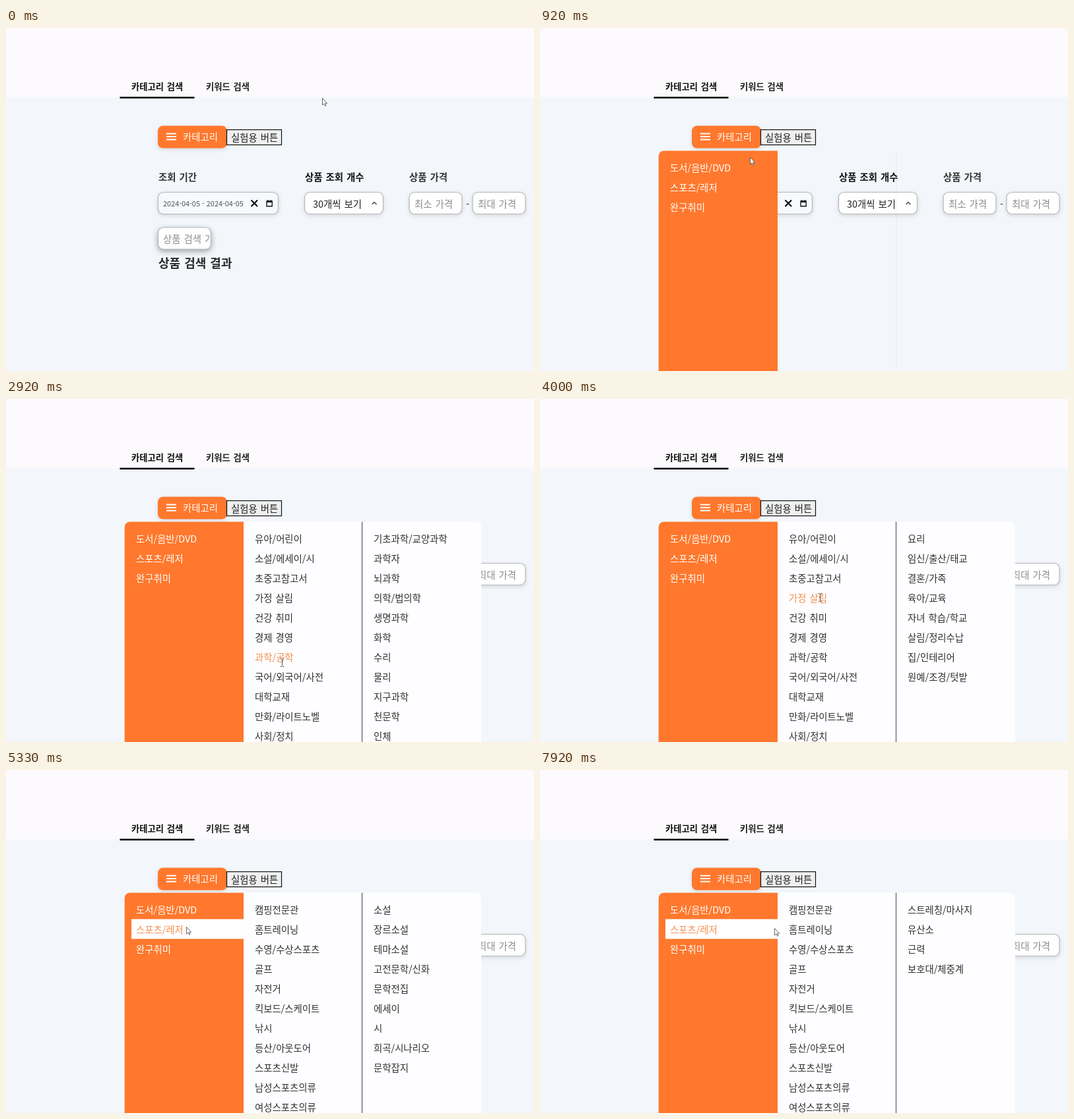
An HTML page that plays this animation: 800 px wide and 521 px high, repeating every 8 s.

```html
<!DOCTYPE html>
<html lang="ko">
<head>
<meta charset="utf-8">
<style>
  html, body { margin: 0; width: 100%; height: 100%; overflow: hidden; background: #f3f7fc; }
  svg { display: block; width: 800px; height: 521px; }
  text { font-family: "Noto Sans CJK KR", "Noto Sans CJK", "Noto Sans CJK JP", sans-serif; word-spacing: 1px; white-space: pre; }
  .soft { filter: drop-shadow(0 2px 3px rgba(0, 0, 0, .13)); }
  .deep { filter: drop-shadow(0 3px 4px rgba(0, 0, 0, .35)); }
</style>
</head>
<body>
<svg viewBox="0 0 800 521">
  <defs>
    <clipPath id="field"><rect x="232" y="304" width="76" height="32"/></clipPath>
  </defs>
  <g id="page"></g>
  <g id="menu"></g>
  <g id="cursor"></g>
</svg>
<script>
const FPS = 12, FRAMES = 96, FADE = 4.2;
const ORANGE = '#ff782d', HOVER = '#f4904f', INK = '#303030';
const SIZE = 14.4, TOP = 197, ROW = 30;
const $ = id => document.getElementById(id);

const categories = ['도서/음반/DVD', '스포츠/레저', '완구취미'];
const groups = [
  ['유아/어린이', '소설/에세이/시', '초중고참고서', '가정 살림', '건강 취미', '경제 경영',
   '과학/공학', '국어/외국어/사전', '대학교재', '만화/라이트노벨', '사회/정치'],
  ['캠핑전문관', '홈트레이닝', '수영/수상스포츠', '골프', '자전거', '킥보드/스케이트',
   '낚시', '등산/아웃도어', '스포츠신발', '남성스포츠의류', '여성스포츠의류']
];
const details = {
  '유아/어린이': ['그림책', '어린이 문학', '초점책/영아책', '놀이책/토이북', '학습/교양', '만화/애니메이션',
    '전집/세트', '어린이 잡지', '유아동 해외도서', '음반/DVD', '누리과정 주제'],
  '소설/에세이/시': ['소설', '장르소설', '테마소설', '고전문학/신화', '문학전집', '에세이', '시', '희곡/시나리오', '문학잡지'],
  '초중고참고서': ['초등 참고서', '중등 참고서', '고등 참고서', '수능 대비', '검정고시', '학습법', '사전/도감'],
  '가정 살림': ['요리', '임신/출산/태교', '결혼/가족', '육아/교육', '자녀 학습/학교', '살림/정리수납', '집/인테리어', '원예/조경/텃밭'],
  '건강 취미': ['건강/의학', '다이어트', '운동/스포츠', '등산/낚시', '바둑/장기', '공예/수예', '반려동물', '사진/영상'],
  '경제 경영': ['경제', '경영', '마케팅', '재테크/투자', '창업/취업', '무역/유통', '회계/세무', '인터넷 비즈니스'],
  '과학/공학': ['기초과학/교양과학', '과학자', '뇌과학', '의학/법의학', '생명과학', '화학', '수리', '물리', '지구과학', '천문학', '인체'],
  '홈트레이닝': ['스트레칭/마사지', '유산소', '근력', '보호대/체중계']
};

// pointer path: step, x, y
const path = [
  [0, 479.5, 106.5], [3, 430, 122], [5, 350, 152], [7, 308, 166], [9, 309, 176], [11, 318, 196],
  [13, 318, 209], [16, 345, 214], [18, 382, 218], [20, 408, 221], [24, 410, 240], [28, 412, 300],
  [32, 416, 372], [35, 418, 400], [40, 421, 396], [44, 424, 352], [48, 424, 301], [50, 424, 294],
  [54, 415, 243], [57, 370, 232], [58, 345, 222], [60, 300, 214], [62, 283, 226], [64, 273, 238],
  [72, 273, 238], [75, 330, 240], [78, 416, 242], [79, 416, 242], [84, 444, 240], [85, 444, 240],
  [86, 440, 241], [87, 440, 241], [88, 444, 240], [90, 444, 240], [95, 355, 240]
];

const label = (x, y, str, fill = INK, size = SIZE, weight = 400, extra = '') =>
  `<text x="${x}" y="${y + size * .4}" font-size="${size}" font-weight="${weight}" fill="${fill}" ${extra}>${str}</text>`;
const rect = (x, y, w, h, fill, extra = '') =>
  `<rect x="${x}" y="${y}" width="${w}" height="${h}" fill="${fill}" ${extra}/>`;
const box = (x, y, w, fill = '#fff', cls = 'soft') =>
  rect(x + .5, y + .5, w - 1, 33, fill, `rx="8" stroke="#b6b6b6" stroke-width="1.2" class="${cls}"`);
const line = (d, stroke, width) =>
  `<path d="${d}" fill="none" stroke="${stroke}" stroke-width="${width}"/>`;

$('page').innerHTML =
  rect(0, 0, 800, 521, '#f3f7fc') + rect(0, 0, 800, 105.5, '#fcfafc') +
  label(190, 89, '카테고리 검색', '#111', 13.3, 700) + label(303, 89, '키워드 검색', '#222', 13.3, 700) +
  rect(172.5, 104.5, 113, 2.5, '#000') +
  rect(230, 148.5, 105, 34, ORANGE, 'rx="8" class="soft"') +
  line('M243 160.5H258M243 165H258M243 169.5H258', '#fff', 1.8) +
  label(268, 165, '카테고리', '#fff') +
  rect(334.5, 154.5, 83, 23, '#efefef', 'stroke="#111" stroke-width="1.2"') +
  label(341, 166, '실험용 버튼', '#222') +
  label(231, 226, '조회 기간', '#333', SIZE, 700) +
  label(453, 226, '상품 조회 개수', '#111', SIZE, 700) +
  label(611, 226, '상품 가격', '#333', SIZE, 700) +
  box(230, 249, 183, '#f6f9fd') +
  label(238, 266.5, '2024-04-05 - 2024-04-05', '#555', 10.9, 400, 'style="word-spacing:0"') +
  line('M371.5 261.5L381 271M381 261.5L371.5 271', '#000', 2) +
  line('M395 263H403.2V270.7H395ZM395 264.2H403.2M396.8 261V263M401.4 261V263', '#111', 1.4) +
  box(452, 249, 120) + label(465, 267, '30개씩 보기', '#222') +
  line('M554.5 268L558 264.5L561.5 268', '#444', 1.4) +
  box(610.5, 249, 81) + label(619, 267, '최소 가격', '#8c8c8c') +
  label(697, 267, '-') +
  box(706.5, 249, 81) + label(715, 267, '최대 가격', '#8c8c8c') +
  box(230, 302.5, 81, '#fff', 'deep') +
  label(238, 320, '상품 검색 가', '#8c8c8c', SIZE, 400, 'clip-path="url(#field)"') +
  label(231, 357, '상품 검색 결과', '#2a2a2a', 18, 700);

const pen = document.createElement('canvas').getContext('2d');
pen.font = SIZE + 'px "Noto Sans CJK KR", "Noto Sans CJK JP", sans-serif';
const textWidth = str => pen.measureText(str).width + str.split(' ').length - 1;

function pointer(n) {
  const i = Math.max(1, path.findIndex(p => p[0] >= n));
  const [a, ax, ay] = path[i - 1], [b, bx, by] = path[i];
  const k = (n - a) / (b - a);
  return [ax + (bx - ax) * k, ay + (by - ay) * k];
}

// walk the pointer once and note what the menu shows at every step
const states = [];
let opened = -1, mid = -1, last = -1, cat = 0, detail = '';
for (let n = 0; n < FRAMES; n++) {
  const [x, y] = pointer(n);
  if (opened < 0 && x > 230 && x < 335 && y > 148 && y < 182) opened = n;
  let col = -1, row = -1, beam = false;
  if (opened >= 0 && y >= TOP && x >= 190 && x < 540) {
    col = x < 360 ? 0 : 1;
    row = Math.floor((y - TOP) / ROW);
    if (col === 0) {
      if (mid < 0) mid = n;
      cat = Math.min(row, 1);
    } else {
      if (last < 0) last = n;
      detail = groups[cat][row];
    }
    const str = (col ? groups[cat] : categories)[row] || '';
    const left = col ? 377 : 197;
    beam = x >= left && x <= left + textWidth(str);
  }
  states.push({ x, y, col, row, beam, opened, mid, last, cat, detail });
}

const fade = (n, start) => start < 0 ? 0 : Math.min(1, (n - start + .1) / FADE);
const list = (x, items, active, fill) =>
  items.map((s, i) => label(x, TOP + 15.6 + i * ROW, s, i === active ? HOVER : fill)).join('');
const group = (opacity, body) => `<g opacity="${opacity}">${body}</g>`;

function drawMenu(n, s) {
  if (s.opened < 0) return '';
  const on = c => s.col === c ? s.row : -1;
  const mark = s.col === 0 ? rect(190, TOP + s.row * ROW - .5, 170.5, ROW, '#fff') : '';
  return group(fade(n, s.opened),
      `<path d="M360 521H179.7V194.5a8 8 0 0 1 8-8H360Z" fill="${ORANGE}"/>` + mark +
      list(197, categories, on(0), '#fff') +
      rect(539, 187, 1, 334, '#444', 'opacity=".05"')) +
    group(fade(n, s.mid),
      rect(360, 186.5, 180, 335, '#fefdff') + list(377, groups[s.cat], on(1), INK) +
      rect(539, 186.5, 1, 335, '#444')) +
    group(fade(n, s.last),
      '<path d="M540 521V186.5H712a8 8 0 0 1 8 8V521Z" fill="#fefdff"/>' +
      list(557, details[s.detail] || [], -1, INK));
}

function drawCursor({ x, y, beam }) {
  const shape = beam
    ? line('M-3 -6H-1L0 -5L1 -6H3M0 -5V5M-3 6H-1L0 5L1 6H3', '#555', 1)
    : '<path d="M0 0V10.5L2.4 8.4L4 11.8L5.5 11.1L4.1 7.8H7Z" fill="#fff" stroke="#555" stroke-width=".9"/>';
  return `<g transform="translate(${Math.floor(x) + .5} ${Math.floor(y) + .5})">${shape}</g>`;
}

let shown = -1;
function tick() {
  const t = performance.now() % 8000;
  const n = Math.min(FRAMES - 1, Math.floor((t + 4) * FPS / 1000));
  if (n !== shown) {
    shown = n;
    $('menu').innerHTML = drawMenu(n, states[n]);
    $('cursor').innerHTML = drawCursor(states[n]);
  }
  requestAnimationFrame(tick);
}
tick();
</script>
</body>
</html>
```
